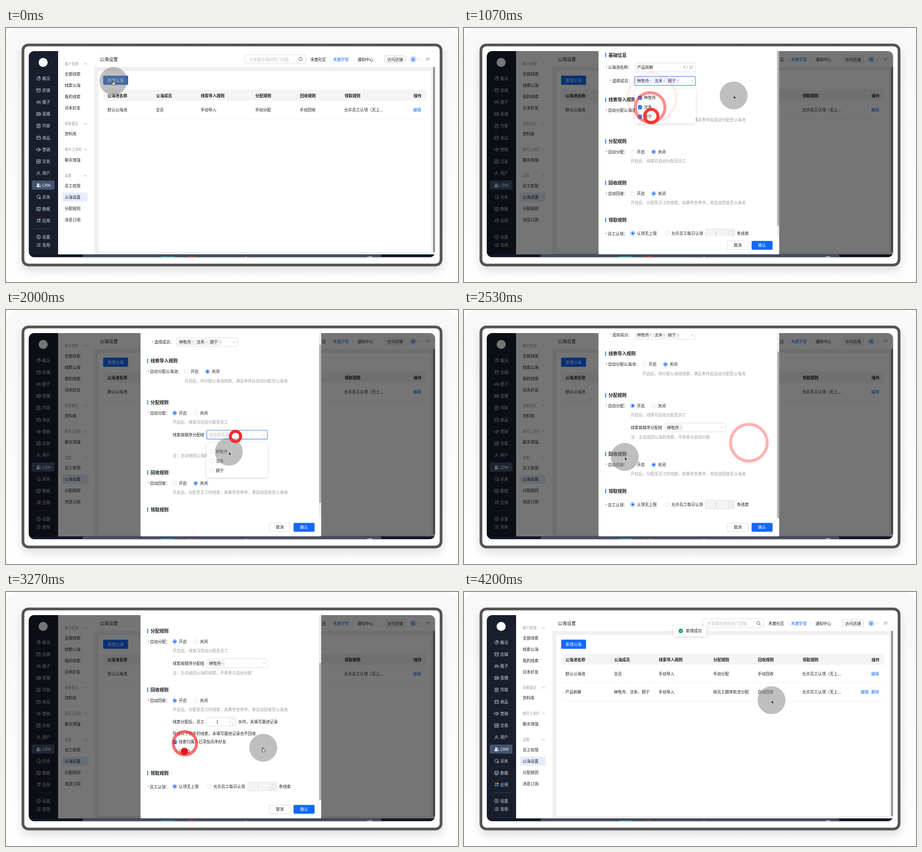
These frames come from a looping animation (998 px wide and 561 px high, 4.27 s). An HTML page:

```html
<!DOCTYPE html>
<html lang="zh-CN">
<head>
<meta charset="utf-8">
<title>公海设置</title>
<style>
  html, body { margin: 0; width: 100%; height: 100%; overflow: hidden; background: #fff; }
  svg { display: block; width: 998px; height: 561px; }
  text { font-family: "Noto Sans CJK SC", "Noto Sans CJK", "Noto Sans", sans-serif; white-space: pre; }
</style>
</head>
<body>
<svg id="stage" viewBox="0 0 998 561" xmlns="http://www.w3.org/2000/svg">
  <defs>
    <linearGradient id="page" x2="0" y2="1"><stop stop-color="#f8f8f8"/><stop offset="1" stop-color="#fff"/></linearGradient>
    <filter id="deviceShadow" x="-10%" y="-10%" width="120%" height="125%"><feDropShadow dx="0" dy="10" stdDeviation="10" flood-opacity=".12"/></filter>
    <filter id="popShadow" x="-20%" y="-20%" width="140%" height="150%"><feDropShadow dx="0" dy="1.5" stdDeviation="3" flood-opacity=".16"/></filter>
    <clipPath id="screen"><rect x="50.3" y="51" width="897.2" height="455.3" rx="12"/></clipPath>
    <clipPath id="modalView"><rect x="297" y="51" width="399" height="409"/></clipPath>
  </defs>
  <rect width="998" height="600" rx="28" fill="url(#page)"/>
  <rect x="37.4" y="37.4" width="923.2" height="486" rx="12" fill="#fff" stroke="#525252" stroke-width="6" filter="url(#deviceShadow)"/>
  <g clip-path="url(#screen)">
    <g id="desktop"></g>
    <g id="table"></g>
    <g id="dialog"></g>
    <g id="toast"></g>
  </g>
  <g id="pointer"></g>
</svg>
<script>
const LOOP = 4270, FPS = 15, LAST = 63;
const BLUE = '#1368fb', FOCUS = '#3f82f6', INK = '#1f1f1f', GREY = '#999', HINT = '#bdbdbd', LINE = '#d9d9d9';
const PEOPLE = ['林牧舟', '沈禾', '顾宁'];
const byId = id => document.getElementById(id);

// ---- drawing helpers; text y is the visual centre ----
const text = (x, y, str, fill = INK, size = 8.75, weight = 400, anchor = 'start') =>
  `<text x="${x}" y="${y + size * .37}" fill="${fill}" font-size="${size}" font-weight="${weight}" text-anchor="${anchor}">${str}</text>`;
const rect = (x, y, w, h, fill, rx = 0, extra = '') =>
  `<rect x="${x}" y="${y}" width="${w}" height="${h}" fill="${fill}" rx="${rx}" ${extra}/>`;
const box = (x, y, w, h, stroke = LINE, fill = '#fff') =>
  rect(x + .5, y + .5, w - 1, h - 1, fill, 1.5, `stroke="${stroke}" stroke-width=".9"`);
const field = (x, y, w, focused) =>
  rect(x + .2, y - 9.8, w - .4, 19.6, '#fff', 2, `stroke="${focused ? FOCUS : LINE}" stroke-width="${focused ? 1.2 : .9}"`);
const circle = (x, y, r, fill, extra = '') => `<circle cx="${x}" cy="${y}" r="${r}" fill="${fill}" ${extra}/>`;
const path = (x, y, d, stroke, width = 1, fill = 'none') =>
  `<path transform="translate(${x} ${y})" d="${d}" fill="${fill}" stroke="${stroke}" stroke-width="${width}" stroke-linejoin="round" stroke-linecap="round"/>`;
const chevron = (x, y, up, color = '#aaa') => path(x, y, up ? 'M-3 1.5L0-1.5 3 1.5' : 'M-3-1.5L0 1.5 3-1.5', color, .8);

const clamp = v => Math.max(0, Math.min(1, v));
const mix = (a, b, k) => a + (b - a) * k;
function track(keys, f) {
  let i = 0;
  while (i < keys.length - 2 && f >= keys[i + 1][0]) i++;
  const [a, b] = [keys[i], keys[i + 1]];
  const k = clamp((f - a[0]) / (b[0] - a[0]));
  return a.slice(1).map((v, j) => mix(v, b[j + 1], k * k * (3 - 2 * k)));
}

// ---- page ----
const NAV = [
  ['概况', 'M0-4a4 4 0 1 0 4 4H0ZM2-3.9A4 4 0 0 1 3.9-2H2Z'],
  ['店铺', 'M-4-3.5h8v2.7h-8zM-3.3-.8v4.6h6.6V-.8'],
  ['圈子', 'M0-3a1.6 1.6 0 1 0 .01 0M-2.3 3.5c0-4 4.6-4 4.6 0M-3-2.5a1.2 1.2 0 0 0 0 2.4M-4.5 2.5q0-2 1.5-2.4M3-2.5a1.2 1.2 0 0 1 0 2.4M4.5 2.5Q4.5.5 3 .1'],
  ['直播', 'M-4-3.3h6.4v6.6h-6.4zM-1.6-1.3L.5 0l-2.1 1.3zM2.4-1.2l2-1v4.4l-2-1'],
  ['内容', 'M-3.2-4h6.5v8h-6.5zM-1.3-1.8h2.7M-1.3 0h2.7M-1.3 1.8h1'],
  ['商品', 'M-2.8-3.6h5.6L4-1v4.6h-8V-1zM-4-1h8'],
  ['营销', 'M-4.3-1.6h2L.8-3.6v7.2l-3.1-2h-2zM2.6-2v4M4.4-1v2'],
  ['交易', 'M-4-4h8v8h-8zM-1.5 2v-3.5M1.5-2v3.5M-2.2-.2h4.4'],
  ['用户', 'M-.3-4a1.8 1.8 0 1 0 .01 0M-4 4c0-5 5-5 5.5-2M2.5 2.8h1.8'],
  ['CRM', 'M-1.3-3.8a1.7 1.7 0 1 0 .01 0M-4.3 3.4c0-4.2 6-4.2 6 0zM2-3a1.4 1.4 0 0 1 0 2.7M3 .5q1.6.9 1.4 2.9H3'],
  ['讯禾', 'M2 2.2A3.7 3.7 0 1 0-1 2.9l-1.3 1M1.5 1.3h2.6v2.4H1.5z'],
  ['数据', 'M-4-3.6h8v5.6h-8zM-2.4 0L-.8-1.4.6-.2 2.4-2M-3 4h6'],
  ['应用', '']
];
const MENU = [
  [79, '客户管理', 1], [101.5, '全部线索'], [126.5, '线索公海'], [151.5, '我的线索'], [176.5, '讯禾好友'],
  [211, '获客雷达', 1], [234, '资料库'], [268.5, '聊天工具栏', 1], [291.3, '聊天增强'],
  [326, '设置', 1], [349, '员工权限'], [373.7, '公海设置'], [398.7, '分配规则'], [423.7, '消息订阅']
];
const COLS = [224, 331, 429.5, 550, 648.5, 747];

function drawDesktop() {
  const soft = '#d6d9e0';
  let s = rect(50, 51, 898, 449, '#f0f0f0') + rect(50, 500, 898, 8, '#0f1726')
    + rect(169, 500.5, 660, 12, '#465063', 4) + rect(341, 505, 32, 6, '#35bfd2', 2)
    + rect(401, 504.5, 16, 6, '#d8403c', 3) + circle(530, 508, 3, '#d9c067')
    + path(803, 506, 'M-5 0h4M0-1h3M5 0h1', '#dfe4ea', 1.5);
  s += rect(50, 51, 65, 449, '#191e2d') + circle(82, 76, 10, '#fff') + rect(57, 337, 50, 20, '#43546f', 2);
  NAV.forEach(([name, d], i) => {
    const y = 111.3 + i * 26.22;
    const active = name === 'CRM';
    s += d ? path(72, y, d, active ? '#fff' : soft, .95, active ? '#fff' : 'none')
      : ['#e84e40', '#f5b932', '#38b56a', '#3d7ff5'].map((c, n) => circle(70 + n % 2 * 4.4, y - 3 + (n >> 1) * 4.4, 1.9, c)).join('');
    s += text(80, y, name, active ? '#fff' : soft);
  });
  s += rect(62, 443, 40, .8, '#434959')
    + path(72, 461.5, 'M-2.3-4h4.6L4.6 0 2.3 4h-4.6L-4.6 0zM0-1.5a1.5 1.5 0 1 0 .01 0', soft, .95) + text(80, 461.7, '设置', soft)
    + path(72, 479.3, 'M-4-3h1M-1-3h5M-4 0h1M-1 0h5M-4 3h8', soft, 1) + text(80, 479.5, '常用', soft);

  s += rect(115, 51, 80, 449, '#fff') + rect(124, 363.5, 56, 20, '#e4ecfd', 2);
  for (const [y, name, group] of MENU)
    s += group ? text(129.5, y, name, GREY, 7.6) + chevron(175.5, y, true, '#888') : text(129.5, y, name);

  s += rect(195, 51, 753, 35, '#fff') + text(207, 69.5, '公海设置', INK, 10, 500)
    + box(527, 58.5, 135, 20) + text(537, 69.3, '大家都在用的热门功能', HINT)
    + path(650, 68.5, 'M0-3.7a3.5 3.5 0 1 0 .01 0M2.4 2.2L4.6 4.4', '#444', 1)
    + text(672, 69.5, '禾鹿社区') + rect(715.5, 65, .7, 8, '#ddd')
    + text(722, 69.5, '禾鹿学堂', BLUE, 8.75, 500) + rect(766, 65, .7, 8, '#ddd') + text(776, 69.5, '通知中心')
    + box(836, 61, 46, 16, '#ccc') + text(859, 69.3, '访问店铺', INK, 8.75, 500, 'middle')
    + circle(899, 69, 7.5, '#d3e3fc') + rect(895.3, 66, 7.4, 6.5, '#5c96ef', 1) + rect(895.3, 68.2, 7.4, .8, '#fff')
    + chevron(912, 69.3, false) + path(931, 68.5, 'M-4-1.5h8L2-3.3M4 1.7h-8l2 1.8', '#777', .8);

  s += rect(204, 95, 735, 400, '#fff') + rect(943, 86, 4.5, 409, '#929292', 1)
    + rect(214.5, 136, 713.5, 24.5, '#f4f4f5');
  ['公海池名称', '公海成员', '线索导入规则', '分配规则', '回收规则', '领取规则'].forEach((h, i) => {
    s += text(COLS[i] + (i ? .6 : 0), 149.3, h, INK, 8.75, 700);
  });
  byId('desktop').innerHTML = s + text(900, 149.3, '操作', INK, 8.75, 700);
}

function row(y, cells) {
  return cells.map((c, i) => text(COLS[i], y, c)).join('') + text(746.5, y, '允许员工认领（无上...')
    + rect(214.5, y + 19, 713.5, .8, '#ededed');
}

function drawTable(f) {
  let s = rect(214.5, 105.3, 55, 20.2, f < 2 ? '#0f58cc' : BLUE, 2) + text(242, 115.5, '新增公海', '#fff', 8.75, 400, 'middle')
    + row(181, ['默认公海池', '全员', '手动导入', '手动分配', '手动回收']) + text(899, 181, '编辑', BLUE);
  if (f >= 58)
    s += row(220.8, ['产品拆解', PEOPLE.join('、'), '手动导入', '按员工顺序轮流分配', '自动回收'])
      + text(876, 220.8, '编辑', BLUE) + text(899, 220.8, '删除', BLUE);
  byId('table').innerHTML = s;
}

// ---- dialog ----
const heading = (y, str) => rect(311.8, y - 5, 1.8, 10, BLUE) + text(319, y, str, INK, 10, 700);
const label = (x, y, str) => text(x - 5.5, y + 1, '*', '#f03c3c') + text(x, y, str);
const radio = (x, y, on, str) => circle(x, y, 4.2, '#fff', `stroke="${on ? BLUE : LINE}" stroke-width="1"`)
  + (on ? circle(x, y, 2.5, BLUE) : '') + text(x + 9.3, y, str);
const onOff = (x, y, on) => radio(x, y, on, '开启') + radio(x + 46.3, y, !on, '关闭');
const check = (x, y, on, str) => box(x - 4.5, y - 4.5, 9, 9, on ? BLUE : LINE, on ? BLUE : '#fff')
  + (on ? path(x, y, 'M-2.2 0l1.6 1.7L2.3-1.6', '#fff', 1) : '') + text(x + 8.8, y, str);
const stepper = (x, y, off) => box(x, y - 10, 65, 20, LINE, off ? '#f4f4f4' : '#fff')
  + text(x + 23.5, y, '1', off ? HINT : INK, 8.75, 400, 'middle')
  + path(x + 51, y, 'M0-9.5v19M0 0h13.5', LINE, .8)
  + path(x + 58, y - 5, 'M-2 1L0-1 2 1', GREY, .7) + path(x + 58, y + 5, 'M-2-1L0 1 2-1', GREY, .7);

function select(x, y, picked, open) {
  let s = field(x, y, 134.5, open) + chevron(x + 127, y, open), tx = x + 3;
  for (const name of picked) {
    const w = name.length * 8.75 + 10.3;
    s += box(tx, y - 6.5, w, 13, '#dcdcdc', '#f8f8f8') + text(tx + 2.2, y, name)
      + path(tx + w - 4.5, y, 'M-2-2l4 4M2-2l-4 4', GREY, .7);
    tx += w + 2;
  }
  return s + (picked.length ? '' : text(x + 5.5, y, '请选择成员', HINT));
}
const dropdown = (x, y, count) => rect(x, y + 18, 134.5, 76, '#fff', 2, 'filter="url(#popShadow)"')
  + PEOPLE.map((p, i) => check(x + 11.5, y + 37 + i * 21, i < count, p)).join('');

const SCROLL = [[25, 0], [28.5, 46], [32.5, 46], [36, 62], [42, 62], [46, 164]];
const VIEW_TOP = 38, VIEW_HEIGHT = 422;

function drawDialog(f) {
  const shown = f < 30 ? clamp((f - 1) / 2) : clamp((58 - f) / 2);
  if (!shown) { byId('dialog').innerHTML = ''; return; }
  const name = f < 9 ? '' : f < 10 ? '产品' : '产品拆解';
  const picked = (f >= 12) + (f >= 14) + (f >= 15);
  const assign = f >= 25, chosen = f >= 32, recover = f >= 41;
  const firstOpen = f >= 11 && f < 18, secondOpen = f >= 30 && f < 36;
  const gap = assign && !chosen ? 25 : 0;
  const recY = 342 + (assign ? 38 + gap : 0);
  const claimY = recY + 82 + (recover ? 102 : 0);
  const [scroll] = track(SCROLL, f);
  const focused = f >= 6 && f < 11;

  let s = heading(59.8, '基础信息') + label(318, 87, '公海池名称：') + field(377, 87, 134.5, focused)
    + text(382.5, 87, name || '请输入公海池名称', name ? INK : HINT) + text(506, 87, `${name.length} / 20`, GREY, 8.75, 400, 'end')
    + (focused ? rect(382 + name.length * 8.75, 82, .9, 10, '#222') : '')
    + label(327.5, 117, '选择成员：') + select(377, 117, PEOPLE.slice(0, picked), firstOpen)
    + heading(158.5, '线索导入规则') + label(318, 182, '自动分配公海池：') + onOff(398.5, 182, false)
    + text(394, 202.5, '开启后，待分配公海池线索，满足条件后自动分配至公海池', GREY)
    + heading(250.3, '分配规则') + label(318, 273.5, '自动分配：') + onOff(372.5, 273.5, assign)
    + text(368, 294.2, '开启后，线索可自动分配至员工', GREY);
  if (assign)
    s += text(368, 321.3, '线索按顺序分配给') + select(443, 321.3, chosen ? PEOPLE.slice(0, 1) : [], secondOpen)
      + text(368, 342.5 + gap, '注：主动退回公海的线索，不再参与自动分配', GREY);
  s += heading(recY, '回收规则') + label(318, recY + 23.7, '自动回收：') + onOff(372.5, recY + 23.7, recover)
    + text(368, recY + 44, '开启后，分配至员工的线索，如果符合条件，将自动回收至公海池', GREY);
  if (recover)
    s += text(368, recY + 70.5, '线索分配后，员工') + stepper(443, recY + 70.5, false) + text(512.5, recY + 70.5, '天内，未填写跟进记录')
      + text(368, recY + 96.5, '符合以下条件的线索，未填写跟进记录也不回收')
      + check(372.5, recY + 115.2, f >= 48, '线索归属人已添加讯禾好友') + check(372.5, recY + 136.7, f >= 50, '已成交');
  s += heading(claimY, '领取规则') + label(317.5, claimY + 31, '员工认领：')
    + radio(372.5, claimY + 29.5, true, '认领无上限') + radio(448.5, claimY + 29.5, false, '允许员工每日认领')
    + stepper(533, claimY + 29.5, true) + text(602.5, claimY + 29.5, '条线索');
  if (firstOpen) s += dropdown(377, 117, picked);
  if (secondOpen) s += dropdown(443, 321.3, chosen ? 1 : 0);

  const ratio = VIEW_HEIGHT / (claimY + 22);
  byId('dialog').innerHTML = `<g opacity="${shown}">` + rect(50, 51, 898, 449, '#000', 0, 'opacity=".54"')
    + rect(297, 45, 399, 455, '#fff', 2)
    + `<g clip-path="url(#modalView)"><g transform="translate(0 ${-scroll})">${s}</g>`
    + rect(691.3, VIEW_TOP, 4.7, VIEW_HEIGHT, '#ebebeb')
    + rect(691.3, VIEW_TOP + scroll * ratio, 4.7, VIEW_HEIGHT * ratio, '#b3b3b3', 2) + '</g>'
    + box(581, 470, 47, 20) + text(604.5, 480, '取消', INK, 8.75, 400, 'middle')
    + rect(635, 470.2, 46.3, 19.6, BLUE, 2) + text(658, 480, '确认', '#fff', 8.75, 400, 'middle') + '</g>';
}

function drawToast(f) {
  const k = clamp((f - 57) / 3);
  byId('toast').innerHTML = k && `<g opacity="${k}" transform="translate(0 ${-20 * (1 - k)})">`
    + rect(463, 74, 72.5, 24, '#fff', 2, 'filter="url(#popShadow)"') + circle(478.5, 86, 5, '#18a058')
    + path(478.5, 86, 'M-2.2 0l1.6 1.7L2.3-1.6', '#fff', 1) + text(490, 86, '新增成功') + '</g>';
}

// ---- pointer ----
const MOVES = [
  [1.5, 237, 117], [5, 455, 84], [5.5, 455, 84], [6, 464, 103], [8, 462, 104], [10.5, 445, 117], [11.9, 415, 154],
  [13.5, 411, 175], [14.9, 413.5, 194.5], [16, 595.3, 149], [18, 595.3, 149], [23, 386, 275], [25, 386, 275],
  [29.1, 507, 279], [30, 492, 313], [32, 484, 313], [34.9, 629, 293], [35.3, 629, 293], [38, 355, 324.5],
  [40, 388, 341], [41, 388, 341], [47, 395, 334], [48.7, 394, 352], [49, 568, 344], [53.4, 667, 483],
  [54.3, 667, 483], [56, 686, 238], [63, 679, 239]
];
const CLICKS = [
  [.3, 237, 119], [5.46, 455, 84], [10.5, 445, 117], [11.95, 415, 154], [13.54, 411, 175.5], [14.92, 413.5, 194.5],
  [17.46, 595, 149], [24.2, 386, 275], [29.18, 506.7, 279.2], [31.3, 484, 313], [34.94, 629, 293], [40.4, 388, 341],
  [47.08, 395, 334], [48.69, 394, 352], [53.46, 667, 483]
];
const CURSORS = {
  arrow: [0, 0, 'M0 0V8.2L2 6.4 3.4 9.3 4.8 8.6 3.5 5.9H6Z', '#111', '#fff'],
  hand: [0, 4, 'M-1.6-4.5q1-1 1.5 0v3.2l3 .6q1.2.4.9 1.7L3.2 5h-4.6L-3.8 1.4q.1-1.4 2.2.1z', '#fff', '#111'],
  beam: [0, 0, 'M-1.5-4.5Q0-4.5 0-3.3 0-4.5 1.5-4.5M0-3.3V3.3M-1.5 4.5Q0 4.5 0 3.3 0 4.5 1.5 4.5M-1 .8h2', 'none', '#111']
};
function cursorKind(f) {
  if (f >= 5 && f < 11) return 'beam';
  return f < 3 || (f >= 11 && f < 16) || (f >= 47 && f < 56) ? 'hand' : 'arrow';
}

function drawPointer(f) {
  const [x, y] = track(MOVES, f);
  const [dx, dy, d, fill, edge] = CURSORS[cursorKind(f)];
  let s = circle(x, y, 30.8, '#808080', 'opacity=".5"') + path(x + dx, y + dy, d, edge, .8, fill);
  for (const [start, cx, cy] of CLICKS) {
    const r = 4 + 13 * (f - start);
    if (f < start || r > 58) continue;
    const width = Math.min(6.6, r);
    const color = r < 13 ? '#e0181c' : '#fd2a2a';
    s += circle(cx, cy, r - width / 2, r < 9 ? color : 'none',
      `stroke="${color}" stroke-width="${width}" opacity="${clamp((60 - r) / 45)}"`);
  }
  byId('pointer').innerHTML = s;
}

// ---- playback ----
const begin = performance.now();
let shownFrame = -1;
function tick() {
  const t = (performance.now() - begin) % LOOP;
  const f = Math.min(LAST, Math.floor((t + 4) * FPS / 1000));
  if (f !== shownFrame) {
    shownFrame = f;
    [drawTable, drawDialog, drawToast, drawPointer].forEach(draw => draw(f));
  }
  requestAnimationFrame(tick);
}
drawDesktop();
tick();
</script>
</body>
</html>
```
